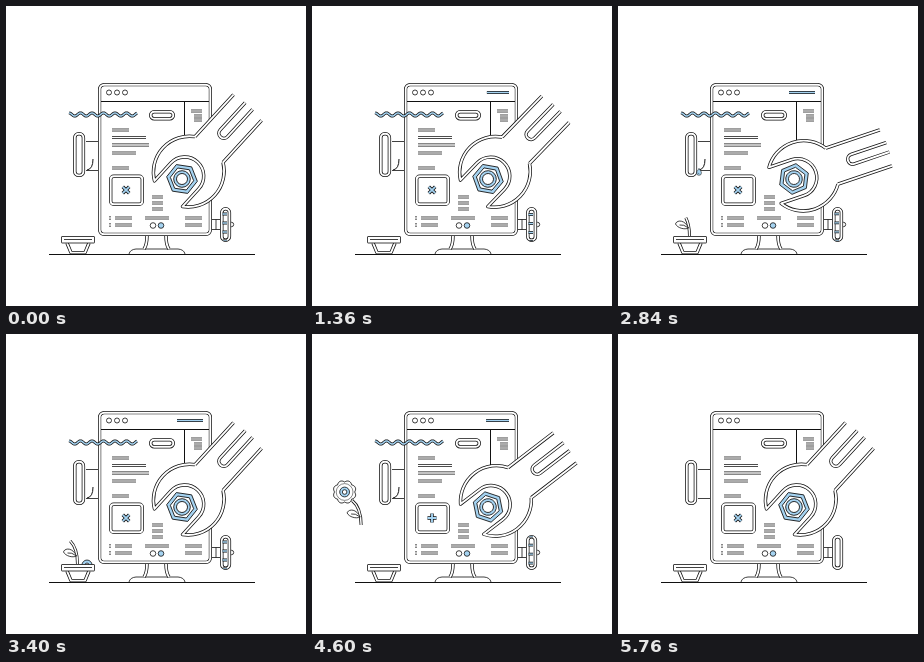
These frames come from a looping animation (300 by 300 pixels, 5800 ms). An HTML page with a canvas:

```html
<!DOCTYPE html>
<html>
<head>
<meta charset="utf-8">
<style>
html, body { margin: 0; width: 100%; height: 100%; overflow: hidden; background: #fff; }
canvas { display: block; width: 300px; height: 300px; }
</style>
</head>
<body>
<canvas id="stage"></canvas>
<script>
const LOOP = 5800, INK = '#111', BLUE = '#a5d3f1';
const canvas = document.getElementById('stage');
const ratio = window.devicePixelRatio || 1;
canvas.width = canvas.height = 300 * ratio;
const c = canvas.getContext('2d');
c.lineJoin = 'round';

const clamp = x => Math.max(0, Math.min(1, x));
const smooth = x => (1 - Math.cos(Math.PI * clamp(x))) / 2;
const span = (t, a, b) => clamp((t - a) / (b - a));

// Eased value between [time, value] keys
function keyed(keys, t) {
  for (let i = 1; i < keys.length; i++) {
    const [t0, v0] = keys[i - 1], [t1, v1] = keys[i];
    if (t < t1) return v0 + (v1 - v0) * smooth((t - t0) / (t1 - t0));
  }
  return keys[keys.length - 1][1];
}

const shape = p => typeof p === 'string' ? new Path2D(p) : p;

function stroke(p, width = 0.8, color = INK) {
  c.lineWidth = width;
  c.strokeStyle = color;
  c.stroke(shape(p));
}

function fill(p, color) {
  c.fillStyle = color;
  c.fill(shape(p));
}

// A thick line seen as two thin edges around a core
function tube(p, core = '#fff', width = 3.4) {
  stroke(p, width);
  stroke(p, width - 1.5, core);
}

function outlined(p, color = '#fff', width = 0.8) {
  fill(p, color);
  stroke(p, width);
}

function disc(x, y, r) {
  const p = new Path2D();
  p.arc(x, y, r, 0, 7);
  return p;
}

function box(x, y, w, h, r) {
  const p = new Path2D();
  p.roundRect(x, y, w, h, r);
  return p;
}

// Closed curve from a radius that depends on the angle
function polar(steps, radius) {
  const p = new Path2D();
  for (let i = 0; i < steps; i++) {
    const a = i / steps * 2 * Math.PI, r = radius(a);
    p.lineTo(r * Math.sin(a), -r * Math.cos(a));
  }
  p.closePath();
  return p;
}

function at(x, y, draw, angle = 0, scale = 1) {
  if (scale <= 0) return;
  c.save();
  c.translate(x, y);
  c.rotate(angle);
  c.scale(scale, scale);
  draw();
  c.restore();
}

const wave = new Path2D();
for (let x = 63; x <= 131; x++) wave.lineTo(x, 108.5 - 1.6 * Math.cos((x - 63) * 2 * Math.PI / 11.5));

const hexOuter = polar(6, () => 15.5), hexInner = polar(6, () => 11.8);
const petals = polar(96, a => 10 + 1.6 * Math.abs(Math.sin(4 * a)));
const HEAD = 'M40 -19 A36 36 0 0 0 -20 -19 L4 -19 A19 19 0 0 1 4 19 L-20 19 A36 36 0 0 0 40 19';
const textLines = [
  [106, 123, 124], [106, 140, 131.5], [106, 143, 139], [106, 130, 147], [106, 123, 162],
  [146, 157, 191], [146, 157, 197], [146, 157, 203],
  [109, 126, 212], [109, 126, 219], [139, 163, 212], [179, 196, 212], [179, 196, 219],
  [185, 196, 105], [188, 196, 110], [188, 196, 114], [103, 105, 212], [103, 105, 219]
];
const swingKeys = [[0, 0], [450, 1], [1520, 0], [1680, 0], [2480, 1], [2780, 1], [3400, 0],
  [3650, 0], [4250, 1], [4830, 0], [5100, 1], [5380, 0]];
const stemKeys = [[1850, 0], [2080, 0.33], [2840, 0.7], [3700, 1]];

function drawMonitor(t, tail) {
  outlined('M123 248 Q124 243.5 130 243 L172 243 Q178 243.5 179 248');
  tube('M141 230 Q141 239 138 243 M160 230 Q160 239 163 243');
  tube(box(93.7, 78.7, 110.6, 149.6, 4.5));
  fill(box(95.5, 80.5, 107, 146, 3), '#fff');
  stroke('M95 95.5 H203 M178.5 95 V140', 1);
  for (const x of [103, 111, 119]) stroke(disc(x, 86.5, 2.5));
  for (const [a, b, y] of textLines) tube(`M${a} ${y} H${b}`, '#fff', 2.8);
  tube(box(144.7, 105.7, 22.6, 7, 3.5));
  tube(box(104.7, 170.2, 31.6, 28, 3));
  outlined(disc(147, 219.5, 2.8));
  outlined(disc(155, 219.5, 2.8), BLUE);

  const turn = (smooth(span(t, 700, 1250)) + smooth(span(t, 4350, 4850))) * Math.PI / 2;
  at(120, 184, () => tube('M-3.2 -3.2 L3.2 3.2 M-3.2 3.2 L3.2 -3.2', BLUE), turn);

  const grown = t < 2900 ? 1 - (1 - t / 2900) ** 3 : 1 - ((t - 2900) / 2900) ** 4;
  if (!tail && grown > 0.02) tube(`M${197 - 26 * grown} 86.5 H197`, BLUE, 3);
}

function drawValves(swing, tail) {
  stroke('M80 135.5 H92 M80 164.5 H92');
  fill(box(67, 126, 12, 45, 5), '#fff');
  tube(box(68.8, 127.8, 8.6, 41.6, 4));
  if (!tail) stroke('M81 164 Q87 163 87 153', 1);

  stroke('M206 213.5 H214 M206 223.5 H214 M210 213.5 V223.5');
  if (!tail) outlined(disc(225.5, 218.5, 2.2));
  fill(box(214, 201, 11, 35, 5), '#fff');
  tube(box(215.8, 202.8, 7.6, 31.4, 3.8));
  if (tail) return;
  c.save();
  c.clip(box(214, 202, 11, 33, 5));
  for (let i = -1; i < 4; i++) tube(`M216.5 ${208 + i * 9 + swing * 9} H221`, BLUE, 2.8);
  c.restore();
}

function drawDrops(t) {
  for (const start of [200, 1500, 2740]) {
    const age = t - start;
    if (age < 0 || age > 720) continue;
    if (age > 600) {
      const sink = span(age, 600, 720) * 5;
      outlined(disc(81, 228.5 + sink, 5), BLUE);
      outlined(disc(81, 228.5 + sink, 2));
      continue;
    }
    at(81, 166 + 62 * span(age, 230, 640) ** 2, () => {
      outlined('M0 -6 C1 -3 4 -1.5 4 1.5 A4 4 0 0 1 -4 1.5 C-4 -1.5 -1 -3 0 -6 Z', BLUE, 0.9);
      stroke('M-1.8 1 Q-1.5 3 0.5 3', 0.7);
    }, 0, 0.3 + 0.7 * span(age, 0, 230));
  }
}

function drawFlower(t) {
  const stem = keyed(stemKeys, t);
  if (stem <= 0.01 || t > 5740) return;
  const u = span(t, 4220, 5400), v = 1 - u;
  const bez = (a, b, d) => 3 * u * v * v * a + 3 * u * u * v * b + u ** 3 * d;
  at(55 + bez(-30, -45, 14), 197 + bez(-30, -95, -165), () => {
    c.save();
    c.setLineDash([27 * stem, 100]);
    tube('M16.5 33 C16.5 24 15 14 7 8', '#fff', 3);
    c.restore();
    at(15.5, 25, () => outlined('M0 0 C-4 -9 -12 -8 -13 -4 C-11 0 -4 2 0 0 Z M0 0 Q-5 -4 -9 -3'),
      0, smooth(span(t, 2380, 2800)));
    at(0, 0, () => {
      outlined(petals, '#fff', 0.9);
      stroke(disc(0, 0, 8.4), 0.5);
      outlined(disc(0, 0, 4.9), BLUE);
      outlined(disc(0, 0, 2.3));
    }, 0, smooth(span(t, 3640, 4000)));
  }, 0, 1 - smooth(span(t, 5400, 5740)));
}

function drawPot() {
  const body = 'M61 237 L65 246.6 H79 L83 237';
  fill(body, '#fff');
  tube(body);
  outlined(box(55.5, 230.5, 33, 6.5, 0.5));
  stroke('M58 233.5 H86');
}

function drawWrench(swing) {
  const angle = (-47.5 + 29.5 * swing) * Math.PI / 180;
  at(176, 173, () => {
    fill(HEAD + ' L97 19 L97 -19 Z', '#fff');
    tube(HEAD + ' M97 19 L40 19 M97 -19 L40 -19 M-20 -19 L4 -19');
    tube('M99 -5 H62 A5 5 0 0 0 62 5 H99');
  }, angle);
  at(176, 173, () => {
    outlined(hexOuter, BLUE);
    outlined(hexInner);
    outlined(disc(0, 0, 8.3), BLUE);
    outlined(disc(0, 0, 5.5));
  }, angle + 26 * Math.PI / 180);
}

function draw(t) {
  const swing = keyed(swingKeys, t);
  const tail = t >= 5755;
  c.setTransform(ratio, 0, 0, ratio, 0, 0);
  c.fillStyle = '#fff';
  c.fillRect(0, 0, 300, 300);
  stroke('M43 248.5 H249', 1);
  drawMonitor(t, tail);
  drawValves(swing, tail);
  if (!tail) tube(wave, BLUE, 3);
  drawDrops(t);
  drawFlower(t);
  drawPot();
  drawWrench(swing);
}

const begin = performance.now();
function tick() {
  draw((performance.now() - begin) % LOOP);
  requestAnimationFrame(tick);
}
tick();
</script>
</body>
</html>
```
